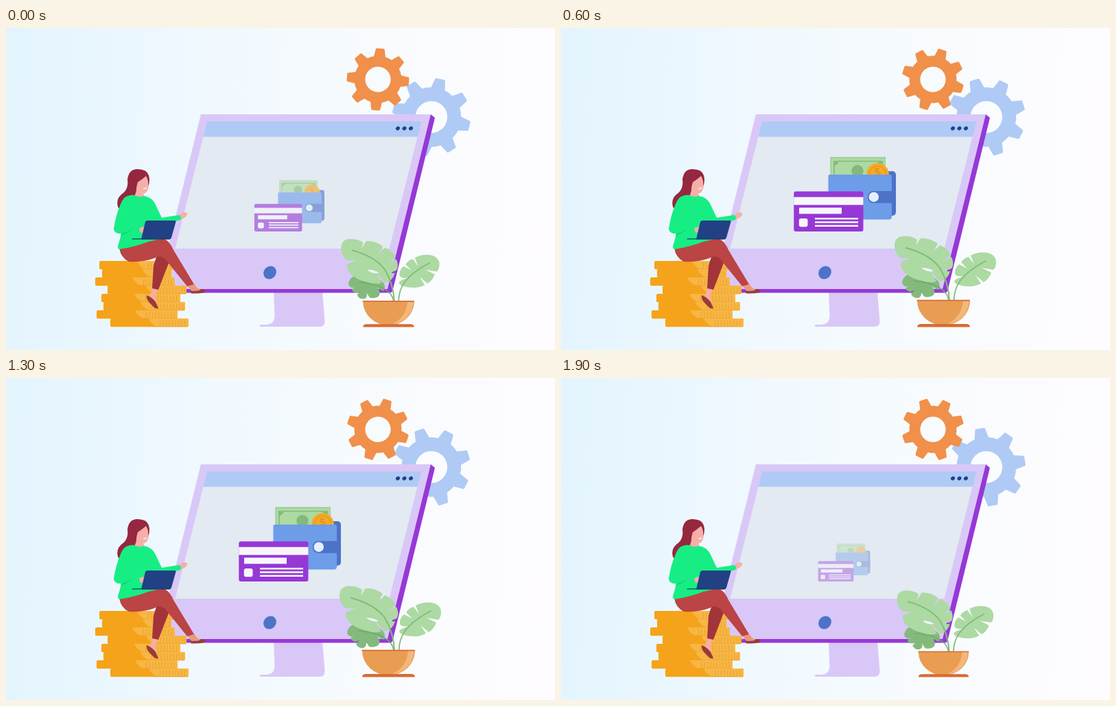
These frames come from a looping animation (800 px wide and 470 px high, 2 s). An HTML page with a canvas:

```html
<!DOCTYPE html>
<html lang="en">
<head>
<meta charset="utf-8">
<title>Online payment</title>
<style>
  html, body { margin: 0; width: 100%; height: 100%; overflow: hidden; }
  canvas { display: block; width: 800px; height: 470px; }
</style>
</head>
<body>
<canvas id="stage" width="800" height="470"></canvas>
<script>
const W = 800, H = 470, LOOP = 2000, STEP = 100;
const LILAC = '#d9c8f7', VIOLET = '#9638d6', SKY = '#afcaf5', NAVY = '#214184', BLUE = '#4d73c8';
const LEAF = '#add9a3', STEM = '#83ba7b', AMBER = '#f5a31a', SKIN = '#f6aea8', HAIR = '#95283f';

const stage = document.getElementById('stage').getContext('2d');
const layer = document.createElement('canvas');
layer.width = W;
layer.height = H;
const layerCtx = layer.getContext('2d');
let ctx = stage;

function fill(color, path) {
  ctx.fillStyle = color;
  ctx.fill(new Path2D(path));
}

function stroke(color, width, path) {
  ctx.strokeStyle = color;
  ctx.lineWidth = width;
  ctx.lineCap = 'round';
  ctx.stroke(new Path2D(path));
}

function box(color, x, y, w, h, r = 0) {
  ctx.fillStyle = color;
  ctx.beginPath();
  ctx.roundRect(x, y, w, h, r);
  ctx.fill();
}

function oval(color, x, y, rx, ry = rx, turn = 0) {
  ctx.fillStyle = color;
  ctx.beginPath();
  ctx.ellipse(x, y, rx, ry, turn, 0, Math.PI * 2);
  ctx.fill();
}

function scaleAbout(x, y, s) {
  ctx.translate(x, y);
  ctx.scale(s, s);
  ctx.translate(-x, -y);
}

// Ease out on entry, mirrored on exit; the loop wraps before the size reaches its minimum.
function growth(t) {
  const away = t < 1340 ? Math.max(0, 400 - t) : Math.min(t - 1340, 2400 - t);
  return 1 - (away * 0.0014) ** 2;
}

function backdrop() {
  const g = ctx.createLinearGradient(0, 0, W, 30);
  g.addColorStop(0, '#e3f4fe');
  g.addColorStop(0.4, '#f1f9fe');
  g.addColorStop(0.7, '#f8fbfe');
  g.addColorStop(1, '#fefcfe');
  ctx.fillStyle = g;
  ctx.fillRect(0, 0, W, H);
}

function gear(color, x, y, outer, root, hole, tip, base, degrees) {
  ctx.save();
  ctx.translate(x, y);
  ctx.rotate(degrees * Math.PI / 180);
  ctx.fillStyle = color;
  ctx.beginPath();
  ctx.arc(0, 0, root, 0, Math.PI * 2);
  ctx.arc(0, 0, hole, 0, Math.PI * 2, true);
  ctx.fill();
  for (let i = 0; i < 8; i++) {
    ctx.beginPath();
    ctx.moveTo(-base, 2 - root);
    ctx.lineTo(-tip, 2 - outer);
    ctx.quadraticCurveTo(-tip, -outer, 2 - tip, -outer);
    ctx.lineTo(tip - 2, -outer);
    ctx.quadraticCurveTo(tip, -outer, tip, 2 - outer);
    ctx.lineTo(base, 2 - root);
    ctx.fill();
    ctx.rotate(Math.PI / 4);
  }
  ctx.restore();
}

function monitor() {
  fill(LILAC, 'M390 384H461L464.5 427Q465 436 457 436H371Q368 433 372 433H380Q391 432 391.500 421Z');
  fill(VIOLET, 'M619 126L625 131L563.500 383Q562.500 386.500 559 386.500H222V381Z');
  fill(LILAC, 'M284 126H619L556 381H221Z');
  fill('#e3eaf2', 'M293 137H605L558.500 322H246.500Z');
  fill(SKY, 'M293 136.500H605.500L600 158.700H287.500Z');
  for (const x of [571, 580.5, 590]) oval('#21428a', x, 146.5, 3.2, 2.7, -0.7);
  oval(BLUE, 384.5, 357, 10, 8.8, -0.8);
}

function banknote() {
  box('#8cc485', 392.5, 188.5, 80.5, 40);
  box(LEAF, 393.5, 189.7, 79, 38);
  stroke(STEM, 1.6, 'M398 214V200Q403 199 404 194.500H462Q463 199 468 200V214');
  fill(STEM, 'M397 194H404Q403 200 397 201ZM469 194H462Q463 200 469 201Z');
  oval(STEM, 432, 208.5, 8.7);
}

function coin() {
  oval('#f5ab24', 461.5, 213.5, 16.3);
  ctx.strokeStyle = '#e2922a';
  ctx.lineWidth = 1.2;
  ctx.beginPath();
  ctx.arc(461.5, 213.5, 12, 0, Math.PI * 2);
  ctx.stroke();
  ctx.save();
  ctx.translate(461, 210);
  ctx.rotate(-0.25);
  ctx.fillStyle = '#dd8a24';
  ctx.font = '15px Arial, "Liberation Sans", sans-serif';
  ctx.textAlign = 'center';
  ctx.textBaseline = 'middle';
  ctx.fillText('$', 0, 1);
  ctx.restore();
}

function wallet() {
  box(BLUE, 420, 209, 68, 65, 5);
  banknote();
  coin();
  box('#6d9ce9', 389.5, 214, 92.5, 65.5, [2, 3, 4, 2]);
  box(BLUE, 447, 238, 41, 17.5, [8, 0, 0, 8]);
  oval('#e6f0fb', 455.8, 246.7, 7.2);
}

function card() {
  const white = '#f8f6fd';
  box(VIOLET, 339.3, 238.5, 101.2, 58.5, 3);
  box(white, 339.3, 246.8, 101.2, 11.5);
  box(white, 347, 262.3, 62, 9);
  box(white, 346.8, 278, 12.7, 12.3, 3);
  for (let i = 0; i < 3; i++) box(white, 370, 277 + i * 5.2, 63, 2.5);
}

function purchase(s) {
  ctx = layerCtx;
  ctx.clearRect(0, 0, W, H);
  ctx.save();
  scaleAbout(411.5, 297, s);
  wallet();
  card();
  ctx.restore();
  ctx = stage;
  ctx.globalAlpha = Math.max(0, (s - 0.2) / 0.8);
  ctx.drawImage(layer, 0, 0);
  ctx.globalAlpha = 1;
}

function plant(s) {
  ctx.save();
  scaleAbout(558, 436.5, 0.9 + 0.1 * s);
  fill(STEM, 'M497 371Q499 360 512 358Q538 357 550 370Q554 378 550 382Q546 381 540 376Q548 386 541 391Q535 394 529 392L524 384Q527 391 521 394Q513 395 510 388L516 382Q509 388 503 382Q500 379 508 377Q498 379 497 371Z');
  stroke('#6da96b', 1.4, 'M514 369Q545 372 558 384Q564 390 565 398');
  fill(LEAF, 'M486 318Q486 306 496 304Q511 303 519 309L517 318L524 307Q538 306 549 315L541 329L552 317Q563 321 568 331L556 341L569 334Q573 343 570 350Q564 356 556 351Q560 356 567 355Q564 367 552 370L538 354L547 370Q537 373 526 369Q511 366 502 358Q494 351 495 342L509 336L495 336Q486 329 486 318Z');
  fill('#f1f5fb', 'M525 350Q537 350 543 355Q533 357 525 350Z');
  stroke(STEM, 2, 'M503 321Q537 330 552 350Q565 372 566 398');
  fill(LEAF, 'M634 340Q634 350 630 353L613 350L627 357Q624 366 616 371L604 361L612 373Q603 378 592 377Q575 376 573 370Q573 366 589 362Q576 364 574 359Q573 351 580 345L592 351L583 342Q588 335 594 334L602 345L597 332Q608 326 621 328Q632 330 634 340Z');
  stroke(STEM, 1.8, 'M619 340Q591 355 581 370Q573 381 572.500 398');
  fill('#e99d53', 'M519 398H596A38.5 36 0 0 1 519 398Z');
  fill('#f4b77b', 'M586 398H594.5A37 35 0 0 1 561 433Q584 423 586 398Z');
  box('#d86b31', 518.5, 396.7, 77.5, 1.8);
  fill('#d86b31', 'M519 436.500Q519 432 525 432H590Q596 432 596 436.500Z');
  ctx.restore();
}

function coins() {
  const rows = [
    [136, 191, 246], [140, 199, 241], [130, 184, 246], [148, 204, 263],
    [139, 187, 254], [142, 196, 261], [132, 188, 250], [152, 208, 266]
  ];
  rows.forEach(([left, split, right], i) => {
    const y = 340 + i * 12;
    box(AMBER, left, y, right - left, 12.3, 2);
    fill('#f7b645', `M${split} ${y}H${right - 2}Q${right} ${y} ${right} ${y + 2}V${y + 10}Q${right} ${y + 12} ${right - 2} ${y + 12}H${split + 12}Q${split + 3} ${y + 8} ${split} ${y}Z`);
    for (let x = split + 16; x < right - 2; x += 4.5) box('#eca42f', x, y + 2.5, 1.1, 8);
    box('#eda52d', split + 8, y + 11.3, right - split - 9, 0.9);
  });
}

function woman() {
  // Legs and shoes
  fill(SKIN, 'M214 379L222 381L217 392L221 401L209 394Z');
  fill('#9a3b38', 'M205 390Q213 393 218 400L222 409Q218 411 213 405Q203 396 205 390Z');
  fill('#a2343a', 'M220 331L239 338L222 382L213 380L215 347Z');
  fill('#e89a78', 'M264 375L274 373L279 380L289 383L270 384Z');
  fill('#9a3b38', 'M268 383Q279 387 284 381Q291 381 290 386Q280 388 270 387.500Z');
  fill('#bb4444', 'M165 321L204 309L231 308Q239 312 244 324L274 374L264 377L231 336Q224 331 216 336Q201 342 179 341Q167 335 165 321Z');

  // Head
  fill(HAIR, 'M193 206Q179 205 177 221Q179 236 168 243Q160 250 163 261Q166 267 175 263L194 245L196 222Z');
  fill(SKIN, 'M190 219L207 215Q210 232 205 239Q202 242 200 241L202 247L186 247Q191 240 190 229Z');
  fill(HAIR, 'M181 212Q189 204 199 207Q208 209 209 220Q209 228 207 230Q208 222 204 216Q197 222 192 225Q190 231 189 240L178 245Z');
  fill('#fde9e8', 'M199.5 234L205.500 232.500Q205 236 201 235.500Z');

  // Arms, sweater and laptop
  fill(SKIN, 'M251 274L257 269.500Q262 268 264.500 271Q264 276 255 279Z');
  fill('#16ee84', 'M175 246Q182 243 187 244Q194 248 201 245Q212 247 217 256L227 277L252 273Q257 276 254 280Q243 284 233 285L225 308L207 312Q190 319 165 323Q161 322 165 312L168 300Q158 301 157 293Q160 273 167 257Q170 249 175 246Z');
  fill('#0fd878', 'M168 300Q178 298 184 292Q179 300 167 303Z');
  fill(SKIN, 'M194 293Q198 288 203 292L201 298L196 299Z');
  fill(NAVY, 'M206 281H246Q248 281 247.500 283L241 306Q240 308.500 238 308.500H197L203 283Q204 281 206 281Z');
  stroke('#24376b', 1.2, 'M184 307.800H238');
}

function draw(t) {
  const s = growth(t);
  const spin = 126 * (1 - s) ** 1.2;
  backdrop();
  gear(SKY, 619.8, 130, 57, 43.5, 23.3, 7.6, 10.5, spin - 18);
  gear('#f0904a', 542, 75, 45.3, 34.5, 18.6, 6.6, 8.6, spin + 18);
  monitor();
  purchase(s);
  plant(s);
  coins();
  woman();
}

function tick() {
  const t = performance.now() % LOOP;
  draw(Math.floor(t / STEP) * STEP);
  requestAnimationFrame(tick);
}
tick();
</script>
</body>
</html>
```
